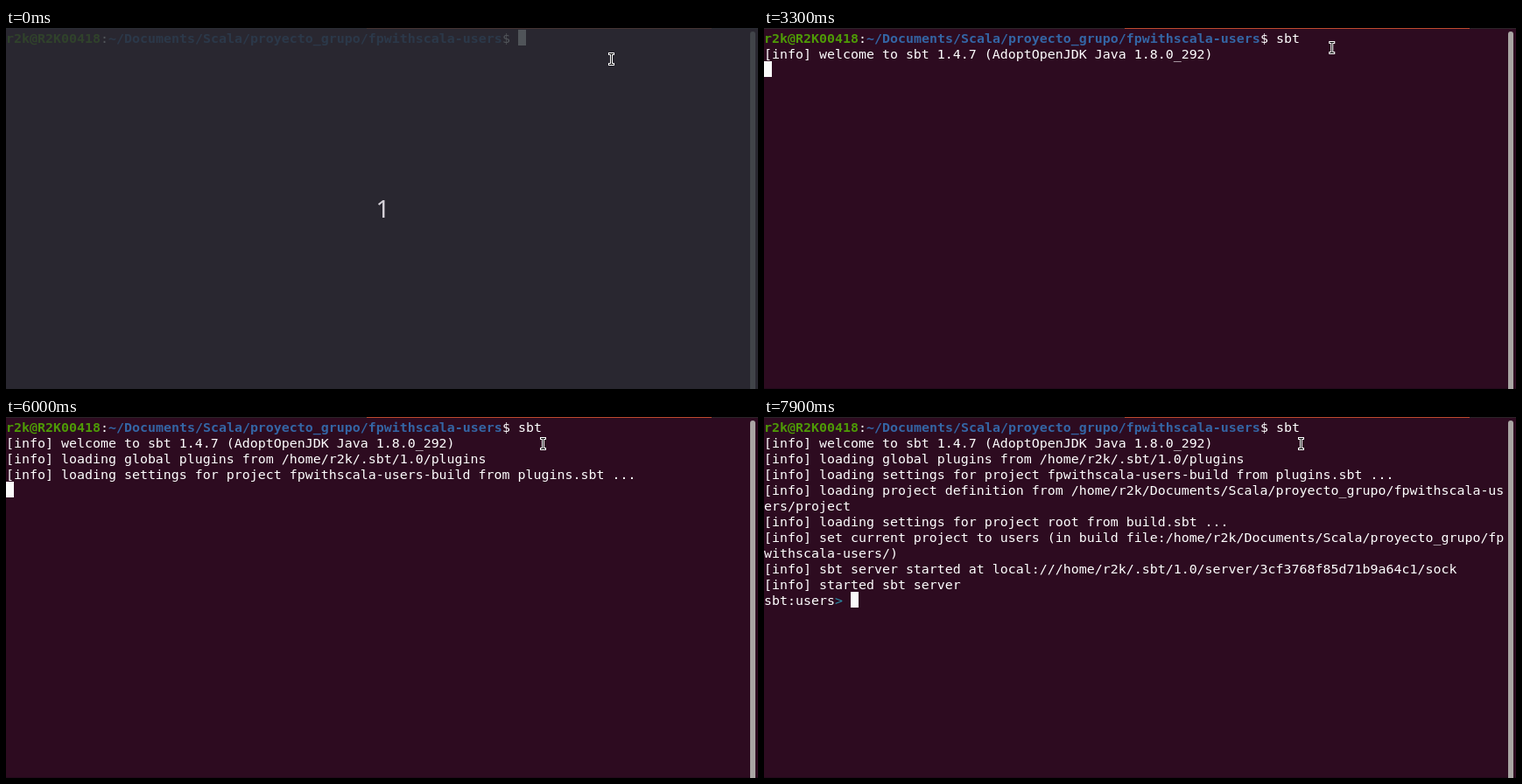
Write an HTML page that moves like this. It is 859 px wide and 413 px high and loops after 8000 ms.

```html
<!DOCTYPE html>
<html lang="en">
<head>
<meta charset="utf-8">
<title>Terminal</title>
<style>
  html, body { margin: 0; width: 100%; height: 100%; overflow: hidden; background: #2d0b20; }
  svg { display: block; width: 100vw; height: 100vh; }
  text { white-space: pre; }
  .term { font: 14.95px "DejaVu Sans Mono", monospace; fill: #fff; }
  .user { font-weight: bold; fill: #4e9a06; }
  .path { font-weight: bold; fill: #3465a4; }
  .mark { fill: #2a8fa8; }
  .digit { font: 28px "Noto Sans", sans-serif; fill: #d5d1d8; text-anchor: middle; }
</style>
</head>
<body>
<svg viewBox="0 0 859 413">
  <rect width="859" height="413" fill="#2d0b20"/>
  <rect width="859" height="1" fill="#2b2428"/>
  <rect x="412" width="394" height="1" fill="#bd4a2d"/>
  <rect y="412" width="859" height="1" fill="#240a1b"/>
  <path d="M850 413V7a3 3 0 0 1 6 0V413Z" fill="#a9a5a3"/>
  <g id="screen" class="term"></g>
  <rect id="caret" width="9" height="18" fill="#fafafa"/>
  <g id="count">
    <rect width="859" height="413" fill="#292e34" opacity=".81"/>
    <text class="digit" x="430.5" y="217">1</text>
  </g>
  <g id="mouse" fill="none">
    <path d="M-2-6H2M-2 6H2M0-6V6" stroke="#fff" stroke-width="3" stroke-linecap="square"/>
    <path d="M-2.5-6H2.5M-2.5 6H2.5M0-6V6" stroke="#111"/>
  </g>
</svg>
<script>
const LOOP = 8000, STEP = 100, BLINK = 600, COUNT_END = 400;
const COL = 9, ROW = 18, TOP = 2, BASE = 17, WIDTH = 94;
const HOME = '/home/r2k', REPO = '/Documents/Scala/proyecto_grupo/fpwithscala-users';

const $ = id => document.getElementById(id);
const show = (el, on) => { el.style.display = on ? '' : 'none'; };
const move = (el, x, y) => el.setAttribute('transform', `translate(${x} ${y})`);

const items = [];           // pieces of text with their life span
const stops = [];           // where the caret rests after each print
const keys = [-200];        // key presses restart the blinking
let row = 0, col = 0;

function addText(start, end, r, c, text, cls) {
  const el = document.createElementNS('http://www.w3.org/2000/svg', 'text');
  el.setAttribute('x', c * COL);
  el.setAttribute('y', BASE + r * ROW);
  el.setAttribute('class', cls);
  el.textContent = text;
  $('screen').append(el);
  items.push({ el, start, end });
}

function newline() {
  row++;
  col = 0;
}

// Prints at the caret, wrapping at the right edge.
function print(start, text, cls = '') {
  text.split('\n').forEach((part, i) => {
    if (i) newline();
    while (part) {
      if (col === WIDTH) newline();
      const piece = part.slice(0, WIDTH - col);
      addText(start, LOOP, row, col, piece, cls);
      col += piece.length;
      part = part.slice(piece.length);
    }
  });
  stops.push({ start, row, col });
}

function press(start, key) {
  keys.push(start);
  print(start, key);
}

const info = (start, text) => print(start, `[info] ${text}\n`);

print(0, 'r2k@R2K00418', 'user');
print(0, ':');
print(0, '~' + REPO, 'path');
print(0, '$ ');
press(600, 's');
press(1100, 'b');
press(1400, 't');
press(1900, '\n');
info(3300, 'welcome to sbt 1.4.7 (AdoptOpenJDK Java 1.8.0_292)');
info(4800, `loading global plugins from ${HOME}/.sbt/1.0/plugins`);
addText(5500, 5600, row + 1, 2, '| => global-plugins / update 0s', '');
info(6000, 'loading settings for project fpwithscala-users-build from plugins.sbt ...');
info(6100, `loading project definition from ${HOME}${REPO}/project`);
info(6400, 'loading settings for project root from build.sbt ...');
info(6600, `set current project to users (in build file:${HOME}${REPO}/)`);
info(6700, `sbt server started at local://${HOME}/.sbt/1.0/server/3cf3768f85d71b9a64c1/sock`);
info(6800, 'started sbt server');
print(6900, 'sbt:users');
print(6900, '> ', 'mark');

function drawCaret(t) {
  const key = keys.findLast(k => k <= t);
  const stop = stops.findLast(s => s.start <= t);
  show($('caret'), Math.floor((t - key) / BLINK) % 2 === 0);
  move($('caret'), stop.col * COL, TOP + stop.row * ROW);
}

// Hidden while typing, then swings left along an arc.
function drawMouse(t) {
  const p = Math.min(1, Math.max(0, (t - 3100) / 400));
  const arc = (a, b, c) => (1 - p) ** 2 * a + 2 * p * (1 - p) * b + p * p * c;
  show($('mouse'), t < 600 || t >= 3100);
  move($('mouse'), arc(691.5, 645, 613.5), arc(35.5, 12, 30.5));
}

function draw(t) {
  for (const { el, start, end } of items) show(el, t >= start && t < end);
  show($('count'), t < COUNT_END);
  drawCaret(t);
  drawMouse(t);
}

const origin = performance.now();
function tick(now) {
  const t = Math.max(0, now - origin) % LOOP;
  draw(Math.floor(t / STEP) * STEP);
  requestAnimationFrame(tick);
}
draw(0);
requestAnimationFrame(tick);
</script>
</body>
</html>
```
